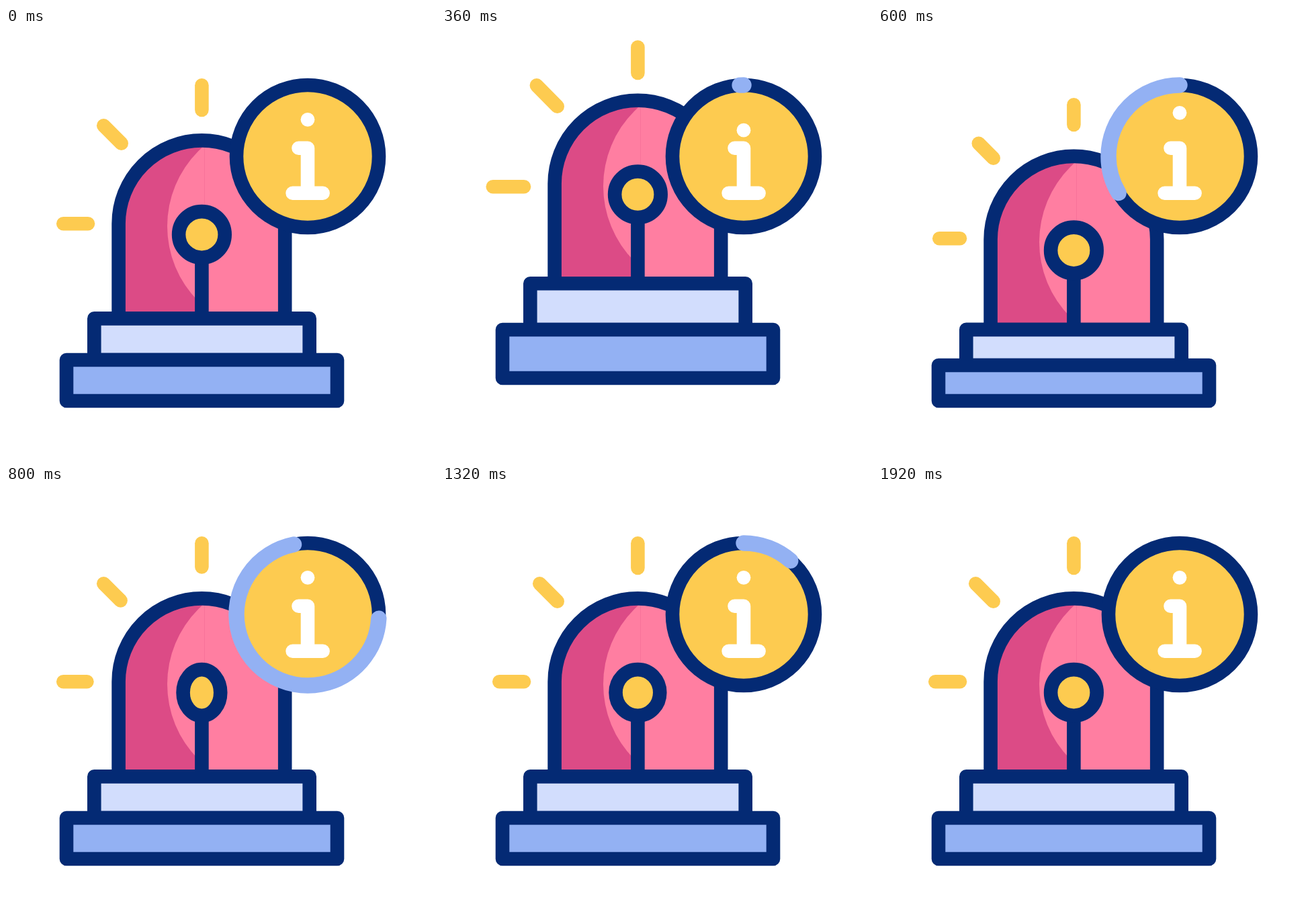
Animation, 640 px wide and 640 px high, one loop 2000 ms. Source, as an HTML page with a canvas:

```html
<!DOCTYPE html>
<html lang="en">
<head>
<meta charset="utf-8">
<title>Alarm light</title>
<style>
html, body { margin: 0; width: 100%; height: 100%; overflow: hidden; background: #fff; }
canvas { display: block; width: 100vw; height: 100vh; }
</style>
</head>
<body>
<canvas id="stage" width="640" height="640"></canvas>
<script>
const ctx = document.getElementById('stage').getContext('2d');
const LOOP = 2000, STEP = 40, LINE = 20.6, CX = 291.4;
const NAVY = '#042a74', YELLOW = '#fdcb50', BLUE = '#93b1f3', PALE = '#d2ddfd';
const PINK = '#ff7ea1', DARK_PINK = '#dc4b86', WHITE = '#fff';

const mix = (a, b, p) => a + (b - a) * p;

// Eased progress from 0 to 1 between two times
function ease(t, from, to) {
  const x = Math.min(1, Math.max(0, (t - from) / (to - from)));
  return x * x * (3 - 2 * x);
}

// Rest, high point, squashed landing, rest
function bounce(t, high, low) {
  if (t < 320) return high * ease(t, 80, 320);
  if (t < 520) return mix(high, low, ease(t, 320, 520));
  return low * (1 - ease(t, 520, 680));
}

function stroke(color, width = LINE) {
  ctx.strokeStyle = color;
  ctx.lineWidth = width;
  ctx.stroke();
}

function fill(color) {
  ctx.fillStyle = color;
  ctx.fill();
}

function line(color, ...points) {
  ctx.beginPath();
  points.forEach(([x, y]) => ctx.lineTo(x, y));
  stroke(color);
}

function box(x1, y1, x2, y2, color) {
  ctx.beginPath();
  ctx.rect(x1, y1, x2 - x1, y2 - y1);
  fill(color);
  stroke(NAVY);
}

function ray(t, inner, outer) {
  const second = t >= 1320;
  const tail = second ? ease(t, 1320, 1640) : ease(t, 760, 1080);
  const head = second ? ease(t, 1560, 1880) : ease(t, 1000, 1320);
  const at = p => [mix(inner[0], outer[0], p), mix(inner[1], outer[1], p)];
  if (tail < 1) line(YELLOW, at(tail), at(1));
  if (head > 0) line(YELLOW, at(0), at(head));
}

function rays(t) {
  const near = bounce(t, -66.5, 44);
  ray(t, [122, 291.3 + near], [85.3 + bounce(t, -12, 12), 291.3 + near]);
  ray(t, [171.7, 171.7 + near], [145.3 + bounce(t, -6, 9), 145.3 + bounce(t, -73, 53)]);
  ray(t, [CX, 122 + near], [CX, 85.3 + bounce(t, -70, 58)]);
}

function knob(t, y, floor) {
  const flip = 1 - 2 * ease(t, 690, 1270) + 2 * ease(t, 1270, 1850);
  line(NAVY, [CX, y + 34.4], [CX, floor]);
  ctx.beginPath();
  ctx.ellipse(CX, y, 34.3 * Math.abs(flip), 34.3, 0, 0, 2 * Math.PI);
  fill(YELLOW);
  stroke(NAVY);
}

function lamp(t) {
  const lift = bounce(t, -72, 47);
  const floor = 432.4 + bounce(t, -62, 33);
  const shelf = 494 + bounce(t, -52, 16);
  const ground = 555 + bounce(t, -38, 0);
  const cy = 291.2 + lift, r = 123.8;

  const dome = new Path2D();
  dome.moveTo(CX - r, floor);
  dome.arc(CX, cy, r, Math.PI, 0);
  dome.lineTo(CX + r, floor);

  ctx.save();
  ctx.clip(dome);
  ctx.fillStyle = PINK;
  ctx.fillRect(150, 0, 290, floor);
  ctx.beginPath();
  ctx.rect(150, 0, CX + 4 - 150, floor);
  ctx.clip();
  ctx.fillStyle = DARK_PINK;
  ctx.fillRect(150, 0, 150, floor);
  ctx.beginPath();
  ctx.arc(398, 295 + lift, 158, 0, 2 * Math.PI);
  fill(PINK);
  ctx.restore();

  ctx.strokeStyle = NAVY;
  ctx.lineWidth = LINE;
  ctx.stroke(dome);
  knob(t, 307.4 + lift, floor);
  box(131.3, floor, 451.7, shelf, PALE);
  box(90, shelf, 493, ground, BLUE);
}

function badge(t) {
  const x = 449, y = 191, top = -Math.PI / 2, turn = 2 * Math.PI;
  ctx.beginPath();
  ctx.arc(x, y, 106, 0, turn);
  fill(YELLOW);
  stroke(NAVY);

  const head = ease(t, 320, 1040), tail = ease(t, 720, 1480);
  if (head > tail) {
    ctx.beginPath();
    ctx.arc(x, y, 106, top - tail * turn, top - head * turn, true);
    stroke(BLUE, 23.4);
  }

  line(WHITE, [435.5, 178.8], [x, 178.8], [x, 245.8]);
  line(WHITE, [426.6, 245.8], [471.6, 245.8]);
  ctx.beginPath();
  ctx.arc(x, 136.3 + bounce(t, 20, -20), 10.4, 0, turn);
  fill(WHITE);
}

function draw(t) {
  ctx.fillStyle = WHITE;
  ctx.fillRect(0, 0, 640, 640);
  ctx.lineCap = ctx.lineJoin = 'round';
  rays(t);
  lamp(t);
  badge(t);
}

const start = performance.now();
function tick() {
  const t = (performance.now() - start) % LOOP;
  draw(Math.floor(t / STEP) * STEP);
  requestAnimationFrame(tick);
}
tick();
</script>
</body>
</html>
```
